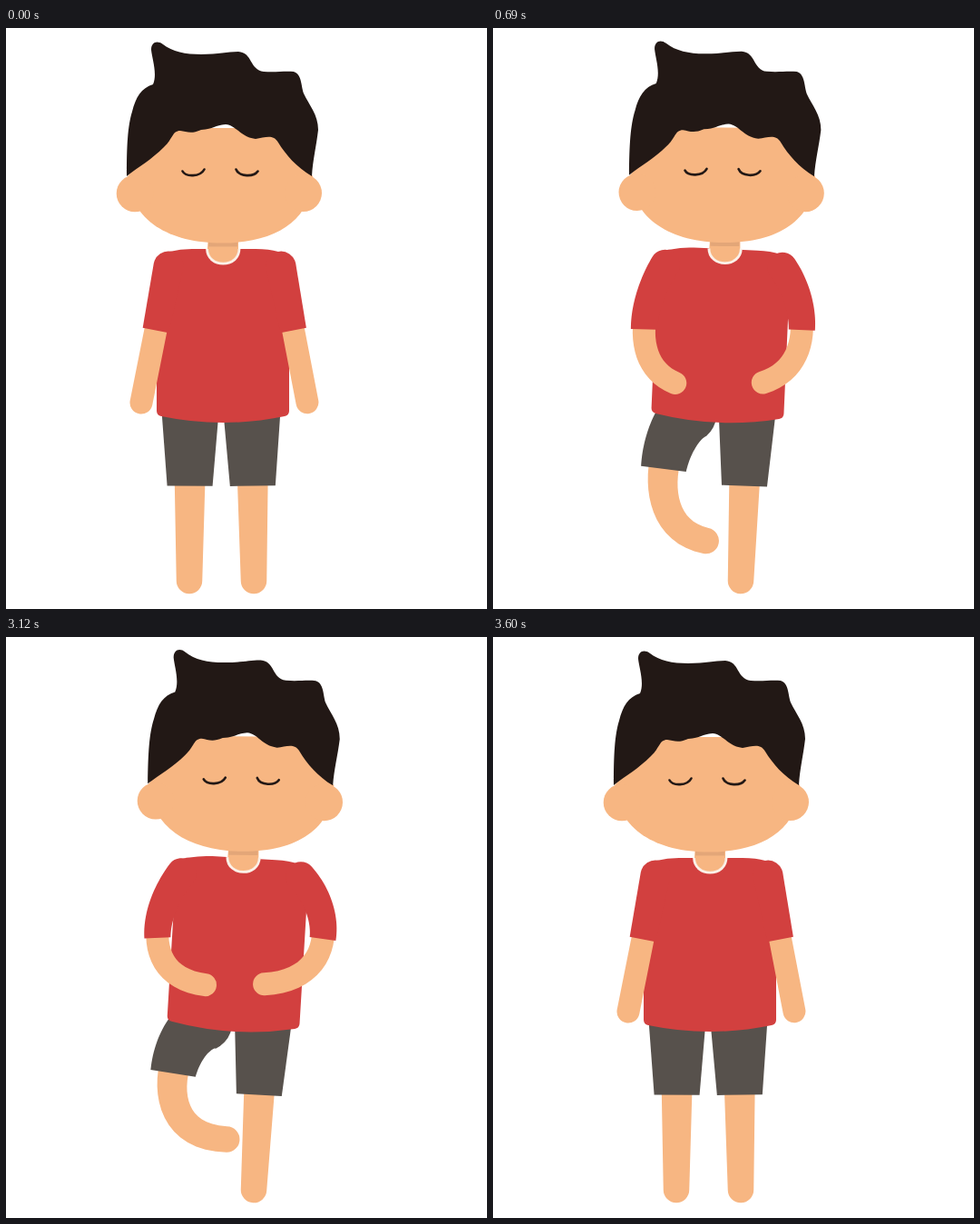
An HTML page for the animation above (4560 ms loop, 530x639 px).

```html
<!DOCTYPE html>
<html lang="en">
<head>
<meta charset="utf-8">
<title>Standing balance</title>
<style>
  html, body { margin: 0; width: 100%; height: 100%; overflow: hidden; background: #fff; }
  svg { display: block; width: 100vw; height: 100vh; }
  .skin { fill: #f7b682; }
  .red { fill: #d2403f; }
  .grey { fill: #57514c; }
  .hair { fill: #221815; }
  .eye { fill: none; stroke: #221815; stroke-width: 2.6; stroke-linecap: round; }
  .collar { fill: none; stroke: #fbf1e8; stroke-width: 2.8; }
</style>
</head>
<body>
<svg viewBox="0 0 530 639">
  <g id="legs"></g>
  <path id="torso" class="red" d="M166 260Q166 247 180 246Q192 243 205 243H275
    Q290 243 300 246Q312 247 312 260V421Q312 426 307 427Q239 441 171 427Q166 426 166 421Z"/>
  <g id="arms"></g>
  <g id="head">
    <path class="skin" d="M223 228H256V243A17 16 0 0 1 222 243Z"/>
    <path class="collar" d="M221.5 243C222 264.5 256.5 264.5 257 243"/>
    <path fill="#e3a678" d="M223 234H255V240.5H223Z"/>
    <g class="skin">
      <path d="M134 163C137 212 180 236.5 238 236.5S337 212 338 163L300 110H180Z"/>
      <circle cx="142" cy="182" r="20.3"/>
      <circle cx="327.5" cy="181.5" r="20.5"/>
    </g>
    <path class="hair" d="M133 163C133 130 134 108 139 92C143 76 149 66 162 62
      C167 50 161 34 160 24C160 16 166 13 173 18C183 26 198 29 215 29
      C235 29 243 26 256 26C272 27 268 46 284 48C298 49 306 47 317 48
      C326 51 325 63 328 72C334 85 344 95 344 112C342 130 338 145 337 163
      C320 153 308 139 300 126C294 116 285 121 275 122C258 120 254 107 242 106
      C230 107 229 111 215 112C204 117 199 114 192 113C183 113 184 122 174 131
      C160 145 147 152 133 163Z"/>
    <path class="eye" d="M194.5 157.5C198 164 214 164 218.5 155.5"/>
    <path class="eye" d="M253.5 155.5C257 164 273 164 277.5 157.5"/>
  </g>
</svg>
<script>
const LOOP = 4560, STEP = 30, SAMPLES = 24;

const upper = { rise: [390, 900], fall: [3000, 3515] };
const lower = { rise: [310, 900], fall: [3000, 3600] };

// Clothing follows the limb from its root up to the fraction "reach".
const sleeve = { style: 'red', widths: [33, 29], reach: 0.47 };
const shorts = { style: 'grey', widths: [62, 50], reach: 0.42 };
const arm = { layer: 'arms', parts: [{ style: 'skin', widths: [25, 25], reach: 1 }, sleeve] };
const leg = { layer: 'legs', parts: [{ style: 'skin', widths: [37, 28.5], reach: 1 }, shorts] };

// Spines run from root to tip: two points are straight, four are a Bezier curve.
const limbs = [
  { ...leg, timing: upper,
    rest: [[271, 428], [273, 608]],
    balance: [[285, 428], [273, 608]] },
  { ...leg, timing: lower,
    rest: [[203, 428], [202, 608]],
    balance: [[220, 424], [176, 437], [150, 550], [248, 546]] },
  { ...arm, timing: upper,
    rest: [[179, 262], [149, 412]],
    balance: [[196, 259], [155, 305], [150, 376], [231, 378]] },
  { ...arm, timing: upper,
    rest: [[303, 262], [332, 412]],
    balance: [[328, 264], [371, 303], [369, 380], [277, 377]] }
];

const torso = document.getElementById('torso');
const head = document.getElementById('head');

const mix = (a, b, u) => a + (b - a) * u;
const mixPoint = (p, q, u) => [mix(p[0], q[0], u), mix(p[1], q[1], u)];

function toCurve(points) {
  if (points.length === 4) return points;
  const [root, tip] = points;
  return [0, 1, 2, 3].map(i => mixPoint(root, tip, i / 3));
}

for (const limb of limbs) {
  limb.rest = toCurve(limb.rest);
  limb.balance = toCurve(limb.balance);
  limb.nodes = limb.parts.map(part => {
    const node = document.createElementNS('http://www.w3.org/2000/svg', 'path');
    node.setAttribute('class', part.style);
    document.getElementById(limb.layer).append(node);
    return node;
  });
}

// Point on the curve and its unit normal, by repeated halving of the control polygon.
function sample(curve, t) {
  let points = curve;
  while (points.length > 2) {
    points = points.slice(1).map((p, i) => mixPoint(points[i], p, t));
  }
  const [a, b] = points;
  const dx = b[0] - a[0], dy = b[1] - a[1], length = Math.hypot(dx, dy);
  return { point: mixPoint(a, b, t), normal: [-dy / length, dx / length] };
}

// Tapered outline with a round root; the tip is round only at full reach.
function outline(curve, { widths: [start, end], reach }) {
  const left = [], right = [];
  for (let i = 0; i <= SAMPLES; i++) {
    const s = i / SAMPLES, half = mix(start, end, s) / 2;
    const { point: [x, y], normal: [nx, ny] } = sample(curve, s * reach);
    const edge = side => `${(x + side * nx * half).toFixed(2)} ${(y + side * ny * half).toFixed(2)}`;
    left.push(edge(1));
    right.unshift(edge(-1));
  }
  const cap = width => `A${width / 2} ${width / 2} 0 0 0 `;
  const tip = reach === 1 ? cap(end) : 'L';
  return `M${left.join('L')}${tip}${right.join('L')}${cap(start)}${left[0]}Z`;
}

function ease(time, [start, end]) {
  const x = Math.min(1, Math.max(0, (time - start) / (end - start)));
  return x * x * (3 - 2 * x);
}

const progress = (time, { rise, fall }) => ease(time, rise) - ease(time, fall);

const lean = (node, dx, dy, angle, pivot) =>
  node.setAttribute('transform', `translate(${dx} ${dy}) rotate(${angle} ${pivot})`);

function draw(time) {
  for (const { rest, balance, timing, parts, nodes } of limbs) {
    const u = progress(time, timing);
    const curve = rest.map((p, i) => mixPoint(p, balance[i], u));
    parts.forEach((part, i) => nodes[i].setAttribute('d', outline(curve, part)));
  }
  const u = progress(time, upper);
  lean(torso, 19.5 * u, 0, 4 * u, '239 335');
  lean(head, 26 * u, -0.8 * u, 0.7 * u, '239 236');
}

const started = performance.now();

function tick() {
  const time = (performance.now() - started) % LOOP;
  draw(Math.floor(time / STEP) * STEP);
  requestAnimationFrame(tick);
}
tick();
</script>
</body>
</html>
```
